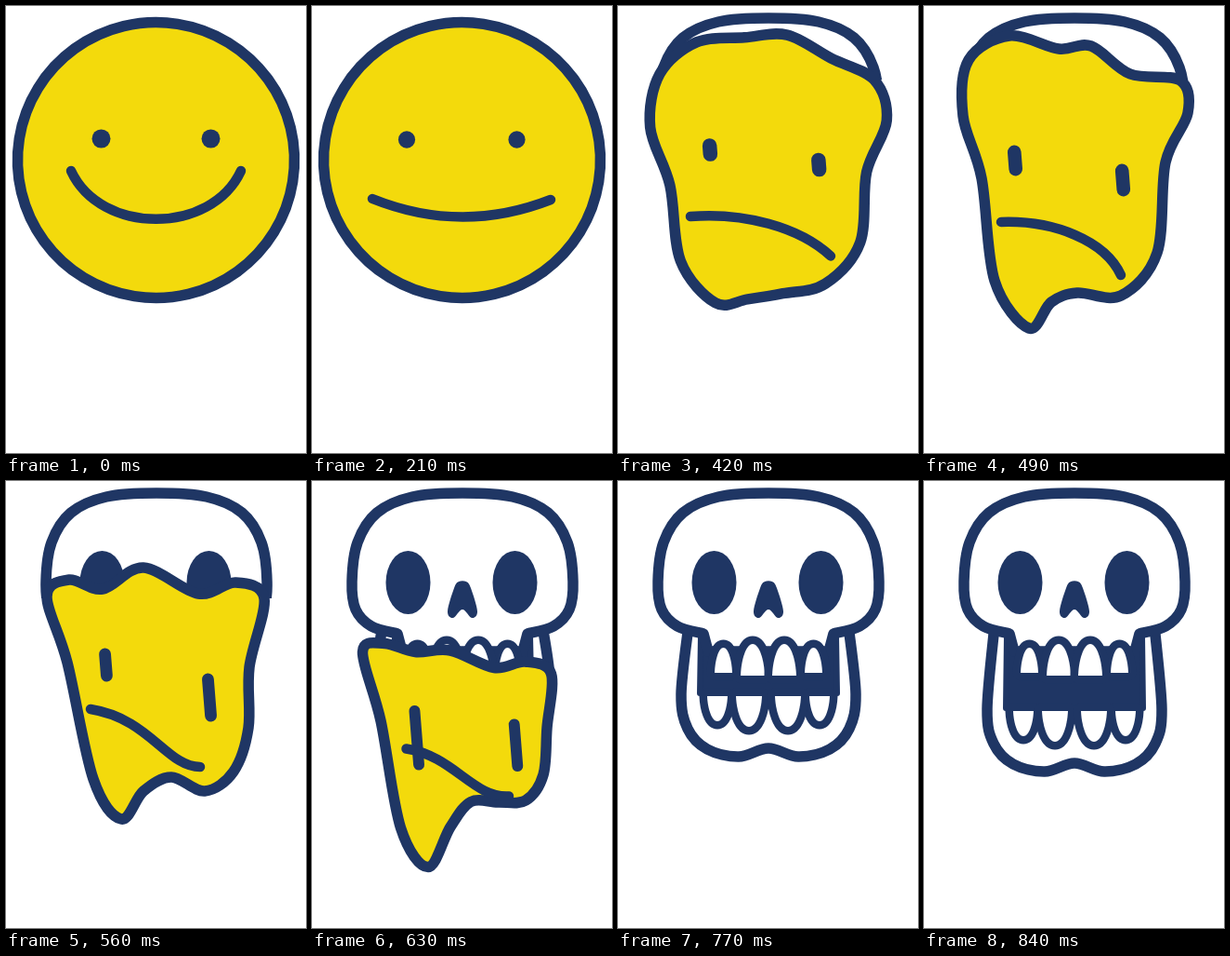
Write an HTML page with a canvas that moves like this. It is 323 px wide and 480 px high and loops after 1050 ms.

```html
<!DOCTYPE html>
<html>
<head>
<meta charset="utf-8">
<style>
html, body { margin: 0; width: 100%; height: 100%; overflow: hidden; background: #fff; }
canvas { display: block; }
</style>
</head>
<body>
<canvas id="stage" width="323" height="480"></canvas>
<script>
const g = document.getElementById('stage').getContext('2d');
const NAVY = '#1f3664', YELLOW = '#f3da0c', WHITE = '#fff';
const LINE = 11.5, STEP = 70, LOOP = 1050, MID = 162;

// 16 outline points, clockwise from the left; squeeze scales the width by height
const round = (squeeze = () => 1) => Array.from({ length: 16 }, (_, i) => {
  const a = (189 + 22.5 * i) * Math.PI / 180, s = Math.sin(a);
  return [161.5 + 149 * Math.cos(a) * squeeze(s), 165.5 + 148 * s];
}).flat();
const pinched = s => .9 - .08 * s - .12 * Math.exp(-(((s - .19) / .15) ** 2));

// eyes: centre x, y, length; mouth: one cubic curve
const poses = [
  { body: round(),
    left: [102.5, 142.5, 0], right: [220.5, 142.5, 0],
    mouth: [70, 177, 102, 246, 221, 246, 253, 177] },
  { body: round(),
    left: [102, 143.5, 0], right: [220.5, 143.5, 0],
    mouth: [65, 207, 130, 233, 193, 233, 257, 208] },
  { body: round(pinched),
    left: [100, 143, 0], right: [218.5, 154, 0],
    mouth: [73, 220, 130, 213, 195, 222, 246, 248] },
  { body: [42, 118, 48, 58, 92, 32, 145, 46, 180, 43, 222, 73, 276, 80, 284, 115,
           260, 168, 251, 265, 212, 311, 165, 308, 137, 318, 113, 346, 76, 295, 62, 185],
    left: [98, 166, 18], right: [214, 187, 20],
    mouth: [83, 232, 140, 230, 195, 252, 212, 289] },
  { body: [44, 124, 68, 106, 104, 116, 148, 93, 207, 121, 247, 109, 278, 126, 262, 200,
           261, 265, 245, 312, 214, 333, 178, 318, 148, 333, 124, 363, 94, 320, 66, 195],
    left: [107.5, 197.5, 23], right: [219, 232.5, 39],
    mouth: [91, 245, 155, 255, 173, 307, 209, 307] },
  { body: [65, 243, 88, 243, 118, 251, 150, 271, 185, 280, 212, 279, 237, 288, 244, 330,
           237, 366, 215, 374, 187, 357, 164, 371, 150, 410, 126, 466, 97, 425, 82, 320],
    left: [118, 354, 92], right: [220, 335, 50],
    mouth: [112, 330, 150, 335, 175, 375, 215, 370] }
];

const pairs = flat => Array.from({ length: flat.length / 2 }, (_, i) => flat.slice(2 * i, 2 * i + 2));

// Right half, starting on the middle line, completed with its reflection
const mirror = (...half) => [
  ...half.slice(1).reverse().map(([x, y]) => [MID - x, y]),
  ...half.map(([x, y]) => [MID + x, y])
];

// Smooth curve through points
function curve(p, closed) {
  const n = p.length;
  const at = i => p[closed ? (i + n) % n : Math.max(0, Math.min(n - 1, i))];
  g.beginPath();
  g.moveTo(...p[0]);
  for (let i = 0; i < (closed ? n : n - 1); i++) {
    const [a, b, c, d] = [at(i - 1), at(i), at(i + 1), at(i + 2)];
    g.bezierCurveTo(b[0] + (c[0] - a[0]) / 6, b[1] + (c[1] - a[1]) / 6,
                    c[0] - (d[0] - b[0]) / 6, c[1] - (d[1] - b[1]) / 6, ...c);
  }
  if (closed) g.closePath();
}

function fill(color) {
  g.fillStyle = color;
  g.fill();
}

function stroke(width = LINE) {
  g.lineWidth = width;
  g.stroke();
}

function tooth(x, w, base, tip) {
  const mid = (base + tip) / 2;
  g.beginPath();
  g.moveTo(x - w, base);
  g.bezierCurveTo(x - w * .95, mid, x - w * .55, tip, x, tip);
  g.bezierCurveTo(x + w * .55, tip, x + w * .95, mid, x + w, base);
  g.closePath();
  stroke(17);
  fill(WHITE);
}

function skull(open) {
  curve(mirror([0, 271 + open], [32, 280 + open], [66, 272 + open], [87, 250 + open], [94, 213 + open], [86, 155]));
  fill(WHITE);
  stroke();

  g.beginPath();
  for (const [x, y] of [[-73, 166], [73, 166], [74, 212 + open], [-74, 212 + open]]) g.lineTo(MID + x, y);
  g.closePath();
  fill(NAVY);
  stroke(6);

  for (const side of [-1, 1]) {
    tooth(MID + 55 * side, 11, 215 + open, 242 + open);
    tooth(MID + 21 * side, 14, 215 + open, 248 + open);
  }

  curve(mirror([0, 13], [54, 17], [92, 34], [113, 66], [119, 108], [115, 138], [98, 156], [70, 164]));
  g.lineTo(MID + 65, 183);
  g.lineTo(MID - 65, 183);
  g.closePath();
  fill(WHITE);
  stroke();

  for (const side of [-1, 1]) {
    tooth(MID + 48.5 * side, 9.5, 206, 179);
    tooth(MID + 17 * side, 13, 209, 175);
    g.beginPath();
    g.ellipse(161 + 57.5 * side, 109, 24, 34, 0, 0, 7);
    fill(NAVY);
  }
  curve(mirror([0, 138], [10, 147], [16, 140], [9, 115], [4, 108]), true);
  fill(NAVY);
}

function eye([x, y, length], width) {
  const dx = length * .04, dy = length / 2 + .1;
  g.beginPath();
  g.moveTo(x - dx, y - dy);
  g.lineTo(x + dx, y + dy);
  stroke(width);
}

function crease([x, y], dx, dy) {
  g.beginPath();
  g.moveTo(x, y);
  g.quadraticCurveTo(x + dx * .6, y + dy * .25, x + dx, y + dy);
  stroke(7);
}

function drop() {
  g.beginPath();
  g.moveTo(190, 383);
  g.bezierCurveTo(210, 425, 203, 439, 194, 439);
  g.bezierCurveTo(184, 439, 186, 415, 190, 383);
  fill(YELLOW);
  stroke(9);
}

function face(pose) {
  const a = poses[Math.floor(pose)], b = poses[Math.ceil(pose)];
  const mix = key => a[key].map((v, i) => v + (b[key][i] - v) * (pose % 1));
  const body = pairs(mix('body')), mouth = mix('mouth'), eyeWidth = 20 - 1.8 * pose;

  if (pose > 2) {
    g.save();
    g.beginPath();
    g.rect(0, 0, 323, body[6][1]);
    g.clip();
    skull(0);
    g.restore();
  }
  curve(body, true);
  fill(YELLOW);
  stroke();

  if (pose === 2) {
    crease(body[15], 18, 12);
    crease(body[8], -22, 18);
  }
  eye(mix('left'), eyeWidth);
  if (pose === 5) return drop();
  eye(mix('right'), eyeWidth);
  g.beginPath();
  g.moveTo(...mouth.slice(0, 2));
  g.bezierCurveTo(...mouth.slice(2));
  stroke(10.5);
}

const order = [0, 0, 0, 1, 1.5, 2, 2.5, 3, 4, 4.5, 5];
g.strokeStyle = NAVY;
g.lineCap = g.lineJoin = 'round';

let start;
function loop(now) {
  start ??= now;
  const step = Math.floor((now - start) % LOOP / STEP);
  g.clearRect(0, 0, 323, 480);
  if (step < order.length) face(order[step]);
  else skull(step === order.length ? 16 : 32);
  requestAnimationFrame(loop);
}
requestAnimationFrame(loop);
</script>
</body>
</html>
```
